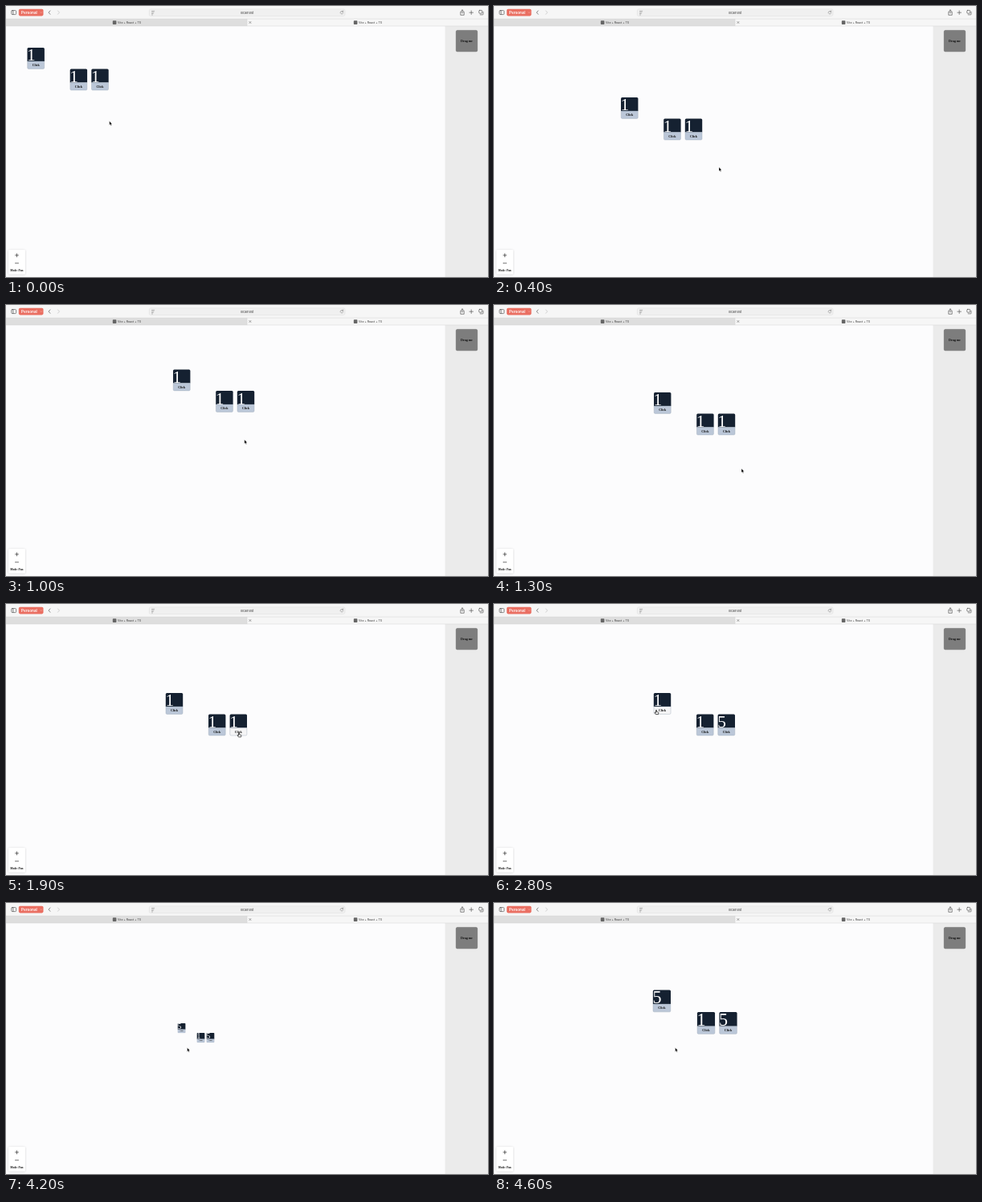
Write an HTML page that moves like this. It is 600 by 338 pixels and loops after 4900 ms.

```html
<!DOCTYPE html>
<html lang="en">
<head>
<meta charset="utf-8">
<title>Canvas board</title>
<style>
  html, body { margin: 0; width: 100%; height: 100%; overflow: hidden; background: #fcfcfd; }
  svg { display: block; width: 100vw; height: 100vh; }
  text { white-space: pre; }
  .ui { font-family: Inter, Roboto, sans-serif; font-size: 3.9px; fill: #3c3c3c; }
  .serif { font-family: "Liberation Serif", "Times New Roman", serif; font-weight: bold; font-size: 4px; text-anchor: middle; fill: #111; }
  .digit { font-family: "Liberation Serif", "Times New Roman", serif; font-size: 21.3px; fill: #fff; }
  .line { fill: none; stroke: #505050; stroke-width: .65; stroke-linecap: round; stroke-linejoin: round; }
</style>
</head>
<body>
<svg viewBox="0 0 600 338" preserveAspectRatio="none">
  <defs>
    <filter id="shadow" x="-30%" y="-30%" width="160%" height="160%">
      <feDropShadow dx="0" dy=".4" stdDeviation="1" flood-color="#000" flood-opacity=".2"/>
    </filter>
    <g id="tab">
      <rect y="18.3" width="4.6" height="4.7" rx=".8" fill="#666"/>
      <text class="ui" x="6.3" y="22" font-size="3.5" style="font-size:3.5px">Vite + React + TS</text>
    </g>
  </defs>

  <rect width="600" height="338" fill="#fcfcfd"/>

  <!-- Sidebar -->
  <rect x="546.5" y="25" width="53.5" height="313" fill="#ebebeb"/>
  <rect x="560.3" y="30.4" width="26.4" height="26.4" rx="1.5" fill="#7d7d7d" stroke="#666" stroke-width=".6"/>
  <text class="serif" x="573.5" y="45.2">Drag me</text>

  <!-- Board -->
  <g id="board"></g>

  <!-- Zoom controls -->
  <rect x="3" y="304" width="21" height="30.5" rx="1.5" fill="#fff" filter="url(#shadow)"/>
  <path class="line" style="stroke:#222" d="M11.5 310.9h4M13.5 308.9v4M11.5 320.8h4"/>
  <text class="serif" x="13.3" y="331.3" style="font-size:3.45px">Mode: Pan</text>

  <!-- Browser chrome -->
  <rect width="600" height="25" fill="#f6f6f6"/>
  <rect y="16" width="300" height="9" fill="#dedede"/>
  <path d="M0 16.1H600M0 25H600M300 16V25" stroke="#d2d2d2" stroke-width=".5"/>
  <use href="#tab" x="132.8"/>
  <use href="#tab" x="432.8"/>
  <path class="line" style="stroke-width:.5" d="M302.8 19.4l2.2 2.2m0-2.2l-2.2 2.2"/>

  <rect class="line" x="6.8" y="5.6" width="5.8" height="5" rx="1"/>
  <path class="line" d="M8.9 5.6v5"/>
  <rect x="15.8" y="3.8" width="30.7" height="8.6" rx="1.8" fill="#ea6f62"/>
  <text class="ui" x="19" y="9.8" style="font-size:4.7px;font-weight:600;fill:#fff">Personal</text>
  <path class="line" style="stroke:#f8c5bd;stroke-width:.5" d="M42.9 7.7l.9 .9l.9-.9"/>
  <path class="line" d="M55 5.9l-2 2.2l2 2.2"/>
  <path class="line" style="stroke:#bdbdbd" d="M64.5 5.9l2 2.2l-2 2.2"/>

  <rect x="178.3" y="3.8" width="243.6" height="8.8" rx="1.8" fill="#f0f0f0" stroke="#dedede" stroke-width=".5"/>
  <path class="line" style="stroke-width:.5;stroke:#777" d="M181.5 6.3h3.2M181.5 7.9h2.5M181.5 9.5h1.7M181.5 11h1"/>
  <text class="ui" x="300" y="9.5" text-anchor="middle">localhost</text>
  <path class="line" style="stroke-width:.5;stroke:#777" d="M419.5 7.2a1.8 1.8 0 1 0 .2 1.6M419.6 5.9v1.4h-1.4"/>

  <path class="line" d="M566.9 7.3h-1.1v4h4.4v-4h-1.1M568 9V4.9M566.7 6.1L568 4.8l1.3 1.3M576.9 8.2h4.6M579.2 5.9v4.6"/>
  <rect class="line" x="588.8" y="5.4" width="3.8" height="3.8" rx=".7"/>
  <path class="line" d="M594 7.2v3a.7 .7 0 0 1-.7 .7h-3.1"/>

  <!-- Pointers -->
  <path id="arrow" d="M0 0V5L1.15 4L1.9 5.7L2.75 5.3L2 3.7L3.4 3.6Z" fill="#000" stroke="#fff" stroke-width=".35"/>
  <path id="hand" d="M-.5-1.9q.5-.7 1 0V.2l1.9.5q.6.2.5.8L2.5 3.3H-.5L-2 1.3q-.1-.8.7-.5l.8.6Z" fill="#fff" stroke="#000" stroke-width=".65"/>
</svg>

<script>
const LOOP = 4900, STEP = 100, UNIT = 26.6, WIDTH = 21.4, HEAD = 17;
const NS = "http://www.w3.org/2000/svg";
const $ = id => document.getElementById(id);

// Board origin, one entry per step, then at rest.
const pan = [
  [26.5, 52], [38, 63], [66, 86], [108, 111], [158, 114], [178, 101], [164, 84], [156, 75.7],
  [194, 83], [213, 87], [208, 80.5], [195, 78], [192, 94], [199, 109], [204, 112], [198.8, 111]
];

// Pointer keys: step, x, y. Straight moves between them.
const pointer = [
  [0, 128.7, 143.6], [1, 149, 163], [2, 185, 194], [3, 238, 207], [4, 280, 201], [5, 281, 182],
  [6, 265, 169], [7, 272.7, 165.6], [8, 305, 177], [9, 307, 174], [10, 296.8, 168], [11, 292, 180],
  [12, 299, 203], [13, 308, 204], [14, 310, 204], [15, 301, 202], [16, 299, 189], [18, 290, 162.6],
  [25, 290, 162.6], [28, 202, 134.3], [36, 202, 134.3], [37, 215, 164], [38, 225.6, 180.4]
];

// Zoom about the resting pointer.
const pivot = [226, 182];
const zoomStart = 40, zoom = [.86, .64, .45, .62, .84, 1, 1.035];

const clicks = [[30, 32, 33, 35], [], [20, 21, 23, 24]];
const slots = [[0, 0], [2, 1], [3, 1]];

function add(parent, tag, attrs, text = "") {
  const el = document.createElementNS(NS, tag);
  for (const key in attrs) el.setAttribute(key, attrs[key]);
  el.textContent = text;
  return parent.appendChild(el);
}

const cards = slots.map(([col, row], i) => {
  const x = col * UNIT, y = row * UNIT;
  const g = add($("board"), "g", { transform: `translate(${x} ${y})` });
  add(g, "path", { d: `M0 ${HEAD}V1.5Q0 0 1.5 0H${WIDTH - 1.5}q1.5 0 1.5 1.5V${HEAD}Z`, fill: "#152131" });
  const button = add(g, "path", {
    d: `M.2 ${HEAD}H${WIDTH - .2}V${UNIT - 1.6}q0 1.4-1.4 1.4H1.6Q.2 ${UNIT - .2} .2 ${UNIT - 1.6}Z`,
    stroke: "#9ba6b6", "stroke-width": .4
  });
  const digit = add(g, "text", { class: "digit", x: -.4, y: 16.4 }, "1");
  add(g, "text", { class: "serif", x: WIDTH / 2, y: 23.1 }, "Click");
  return { x, y, button, digit, clicks: clicks[i] };
});

function pointerAt(step) {
  const next = pointer.findIndex(key => key[0] > step);
  if (next < 0) return pointer.at(-1).slice(1);
  const [s0, x0, y0] = pointer[next - 1], [s1, x1, y1] = pointer[next];
  const k = (step - s0) / (s1 - s0);
  return [x0 + (x1 - x0) * k, y0 + (y1 - y0) * k];
}

function boardAt(step) {
  const [x, y] = pan[Math.min(step, pan.length - 1)];
  const scale = step < zoomStart ? 1 : zoom[Math.min(step - zoomStart, zoom.length - 1)];
  return { scale, x: pivot[0] + (x - pivot[0]) * scale, y: pivot[1] + (y - pivot[1]) * scale };
}

function draw(step) {
  const board = boardAt(step), [px, py] = pointerAt(step);
  $("board").setAttribute("transform", `translate(${board.x} ${board.y}) scale(${board.scale})`);
  let onButton = false;
  for (const card of cards) {
    const dx = (px - board.x) / board.scale - card.x;
    const dy = (py - board.y) / board.scale - card.y;
    const hover = dx > 0 && dx < WIDTH && dy > HEAD && dy < UNIT;
    onButton ||= hover;
    card.button.setAttribute("fill", hover ? "#f5f5f6" : "#bbc7d8");
    card.digit.textContent = 1 + card.clicks.filter(s => s <= step).length;
  }
  for (const [id, shown] of [["arrow", !onButton], ["hand", onButton]]) {
    $(id).setAttribute("transform", `translate(${px} ${py})`);
    $(id).style.display = shown ? "" : "none";
  }
}

let last = 0;
const start = performance.now();
function tick() {
  const step = Math.floor(((performance.now() - start) % LOOP) / STEP);
  if (step !== last) draw(last = step);
  requestAnimationFrame(tick);
}
draw(0);
tick();
</script>
</body>
</html>
```
